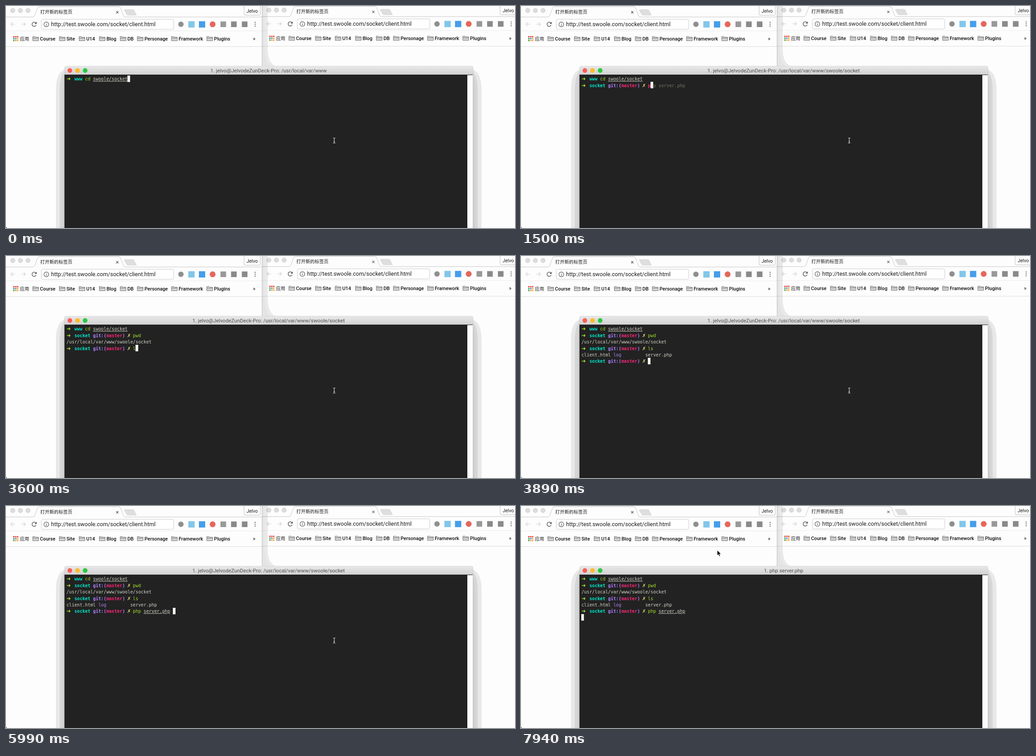
Animation, 1132 px wide and 495 px high, one loop 8000 ms. Source, as an HTML page:

```html
<!DOCTYPE html>
<html lang="en">
<head>
<meta charset="utf-8">
<title>Terminal session</title>
<style>
  html, body { margin: 0; width: 100%; height: 100%; overflow: hidden; background: #fdfdfd; }
  svg { display: block; }
  text { font-family: Roboto, "Noto Sans CJK SC", "Noto Sans CJK", sans-serif; fill: #1a1a1a; white-space: pre; }
  .mark { font-size: 10.8px; font-weight: 500; fill: #111; }
  .cjk { font-size: 10.2px; }
  #screen text { font: 9.83px "DejaVu Sans Mono", monospace; fill: #d2d2c6; }
  #screen .dir, #screen .git, #screen .branch, #screen .bad { font-weight: bold; }
  #screen .arrow, #screen .dirty { font: bold 11.5px "DejaVu Sans", sans-serif; fill: #a6e22e; }
  #screen .dir { fill: #00e6c8; }
  #screen .git, #screen .folder { fill: #ae81ff; }
  #screen .branch, #screen .bad { fill: #f92672; }
  #screen .dirty { font-size: 10.5px; fill: #e6db74; }
  #screen .cmd { fill: #a6e22e; }
  #screen .ghost { fill: #75715e; }
  #screen .path { text-decoration: underline; }
</style>
</head>
<body>
<svg width="1132" height="495" viewBox="0 0 1132 495">
  <defs>
    <linearGradient id="bar" x2="0" y2="1">
      <stop stop-color="#e8e8e8"/><stop offset="1" stop-color="#d2d2d2"/>
    </linearGradient>
    <g id="browser">
      <rect width="570" height="496" fill="#fdfdfd"/>
      <path d="M0 24.5H60Q63 24 64 21L70 5Q71 2 75 1.500H250Q254 2 255 5L261 21Q262 24 265 24.500H570" fill="none" stroke="#c6c6c6"/>
      <path d="M264 8H282Q284 8 285 10L290 20.500H272Q269 20.500 268 18L263 9.500Z" fill="#dedede" stroke="#cfcfcf" stroke-width=".7"/>
      <g fill="#dcdcdc" stroke="#cacaca" stroke-width=".8">
        <circle cx="15" cy="10" r="5"/><circle cx="32" cy="10" r="5"/><circle cx="49" cy="10" r="5"/>
      </g>
      <text class="cjk" x="76.300" y="16.800">打开新的标签页</text>
      <path d="M245 11.500l5 5m0-5l-5 5" stroke="#555" stroke-width="1.100"/>
      <rect x="529.5" y="-3" width="36" height="23.500" rx="2.500" fill="#fefefe" stroke="#c0c0c0"/>
      <text x="535" y="14.700" font-size="10.500">Jelvo</text>
      <g fill="none" stroke="#d9d9d9" stroke-width="1.400">
        <path d="M20 40.500H10.500m4.500-4.500l-4.500 4.500 4.500 4.500M34 40.500h9.500m-4.500-4.500l4.500 4.500-4.500 4.500"/>
        <path d="M66.500 38a4.700 4.700 0 1 0 .5 4.500" stroke="#606060" stroke-width="1.500"/>
      </g>
      <path d="M68.300 35v5h-5z" fill="#606060"/>
      <rect x="78.5" y="29.500" width="294.500" height="22.500" rx="3" fill="#fff" stroke="#cbcbcb"/>
      <circle cx="89.700" cy="41" r="5.300" fill="none" stroke="#5a5a5a" stroke-width="1.200"/>
      <path d="M89.700 40.300v3.700M89.700 37.800v1.300" stroke="#5a5a5a" stroke-width="1.300"/>
      <text x="100.300" y="45.200" font-size="12.500">http://test.swoole.com/socket/client.html</text>
      <circle cx="389" cy="40.800" r="6" fill="#8f8f8f"/>
      <rect x="405.500" y="34" width="14" height="14" fill="#82c6ea"/>
      <rect x="429" y="34" width="14" height="14" fill="#469eea"/>
      <circle cx="459.500" cy="40.800" r="6.500" fill="#e5675c"/>
      <rect x="477" y="34.500" width="12.500" height="12.500" fill="#999"/>
      <rect x="500.500" y="34.500" width="12.500" height="12.500" fill="#8a8a8a"/>
      <rect x="524.500" y="34.500" width="12.500" height="12.500" fill="#8a8a8a"/>
      <path d="M554 36.500v.01m0 4.200v.01m0 4.200v.01" stroke="#555" stroke-width="2.300" stroke-linecap="round"/>
      <path d="M0 55.500H570" stroke="#ececec"/>
      <g id="bookmarks"></g>
      <text class="cjk" x="31" y="77">应用</text>
      <text x="549" y="76.500" font-size="12">»</text>
      <path d="M0 90.500H570" stroke="#dcdcdc"/>
    </g>
    <g id="shadow">
      <path d="M131 141Q111 149 111 186V496H131Z" fill="#e8e8e8"/>
      <path d="M131 146Q119.500 156 119.500 190V496H131Z" fill="#d6d6d6"/>
      <path d="M131 152Q126.500 162 126.500 194V496H131Z" fill="#cccccc"/>
    </g>
  </defs>

  <use href="#browser" x="569.5" y="-.8"/>
  <g style="mix-blend-mode:multiply">
    <path d="M570 0H582V95Q582 127 600 134.500H570Z" fill="#ebebeb"/>
    <path d="M570 0H574V90Q575 124 588 134.500H570Z" fill="#e6e6e6"/>
  </g>
  <use href="#browser"/>
  <path d="M569.500 0V135" stroke="#bdbdbd"/>
  <path d="M0 492.500Q.5 494.500 2.500 495H0Z"/>

  <use href="#shadow"/>
  <use href="#shadow" transform="matrix(-1 0 0 1 1168.500 0)"/>
  <path d="M130 153V138.500Q130 134 134.500 134H1034.500Q1039 134 1039 138.500V153Z" fill="url(#bar)" stroke="#c4c4c4" stroke-width=".5"/>
  <circle cx="142" cy="143.700" r="5.200" fill="#fb5f57"/>
  <circle cx="159" cy="143.700" r="5.200" fill="#fdbd2e"/>
  <circle cx="176" cy="143.700" r="5.200" fill="#2ac940"/>
  <text id="title" x="584" y="148" font-size="11.500" text-anchor="middle" style="fill:#505050"></text>
  <rect x="130" y="153" width="908" height="342" fill="#222"/>
  <rect x="1026" y="154" width="12" height="341" fill="#fcfcfc"/>
  <g id="screen"></g>
  <path id="beam" d="M-2.500-6Q0-6 0-4Q0-6 2.500-6M0-4V4M-2.500 6Q0 6 0 4Q0 6 2.500 6M-1.500 2h3" fill="none" stroke="#eee"/>
  <path id="pointer" d="M436.300 98.500V110.500L439 108L441 112.500L443.200 111.500L441.200 107.200H445Z" fill="#000" stroke="#fff" stroke-width=".9"/>
</svg>
<script>
const $ = id => document.getElementById(id);
const LOOP = 8000, LEFT = 134.4, TOP = 155.4, CELL = 5.917, LINE = 14.37;
const COMMAND = 'php server.php', INPUT = 25;

// [time, row, column] of the block cursor
const cursorStops = [
  [0, 0, 23], [300, 1, 0], [450, 1, 25], [1500, 1, 26], [1650, 1, 28], [1950, 3, 25],
  [3600, 3, 26], [3740, 5, 0], [3890, 5, 25], [4940, 5, 26], [5090, 5, 28], [5240, 5, 29],
  [5540, 5, 30], [5690, 5, 32], [5990, 5, 40], [6590, 6, 0]
];

const run = (row, col, text, style = '') =>
  `<text x="${LEFT + col * CELL}" y="${TOP + 11 + row * LINE}" class="${style}">${text}</text>`;

const prompt = row => run(row, 0, '➜', 'arrow') + run(row, 3, 'socket', 'dir') + run(row, 10, 'git:(', 'git') +
  run(row, 15, 'master', 'branch') + run(row, 21, ')', 'git') + run(row, 22.8, '✗', 'dirty');

// The block sits on whole pixels
const block = (row, col) =>
  `<rect x="${Math.floor(LEFT + col * CELL)}" y="${Math.floor(TOP + row * LINE)}" width="6" height="14.5" fill="#f3f3ee"/>`;

function screenAt(t) {
  const [, row, col] = cursorStops.filter(stop => stop[0] <= t).pop();
  let out = run(0, 0, '➜', 'arrow') + run(0, 3, 'www', 'dir') + run(0, 7, 'cd', 'cmd') + run(0, 10, 'swoole/socket', 'path');
  if (t >= 450) out += prompt(1);
  if (t >= 1500) out += t < 1650 ? run(1, INPUT, 'p', 'bad') : run(1, INPUT, 'pwd', 'cmd');
  if (t >= 1950) out += run(2, 0, '/usr/local/var/www/swoole/socket') + prompt(3);
  if (t >= 3600) out += run(3, INPUT, t < 3740 ? 'l' : 'ls', 'cmd');
  if (t >= 3740) out += run(4, 0, 'client.html') + run(4, 12, 'log', 'folder') + run(4, 24, 'server.php');
  if (t >= 3890) out += prompt(5);
  if (t >= 4940) {
    const typed = row === 5 ? COMMAND.slice(0, col - INPUT) : COMMAND;
    out += run(5, INPUT, typed.slice(0, 3), typed === 'p' ? 'bad' : 'cmd') + run(5, INPUT + 4, typed.slice(4), 'path');
  }
  if ((t >= 1500 && t < 1650) || (t >= 4940 && t < 5990))
    out += run(row, col + 1, COMMAND.slice(col + 1 - INPUT), 'ghost');
  return out + block(row, col);
}

function titleAt(t) {
  if (t >= 6590) return '1. php server.php';
  return '1. jelvo@JelvodeZunDeck-Pro: /usr/local/var/www' + (t < 450 ? '' : '/swoole/socket');
}

function drawBookmarks() {
  const folders = { Course: 59, Site: 118, U14: 162, Blog: 207, DB: 253.5, Personage: 291.5, Framework: 367.5, Plugins: 446 };
  const colors = { r: '#e5493a', g: '#3f9f58', b: '#4a86e8', y: '#f0a030' };
  let out = '';
  [...'rrrgbygyy'].forEach((color, i) => {
    const x = 16 + i % 3 * 4.2, y = 67 + Math.floor(i / 3) * 4.2;
    out += `<rect x="${x}" y="${y}" width="3" height="3" fill="${colors[color]}"/>`;
  });
  for (const [name, x] of Object.entries(folders))
    out += `<path d="M${x + .5} 77.500v-9.500h5l1.500 1.500h6.500v8zM${x + .5} 71.500h13" fill="#d0d0d0" stroke="#707070" stroke-width=".9"/>
      <text class="mark" x="${x + 16.5}" y="76.500">${name}</text>`;
  $('bookmarks').innerHTML = out;
}

let shown;
function frame() {
  const t = performance.now() % LOOP;
  const screen = screenAt(t);
  if (screen !== shown) $('screen').innerHTML = shown = screen;
  $('title').textContent = titleAt(t);
  $('beam').setAttribute('transform', t < 7790 ? 'translate(730 300)' : 'translate(698 278)');
  $('beam').style.display = t < 7940 ? '' : 'none';
  $('pointer').style.display = t < 7940 ? 'none' : '';
  requestAnimationFrame(frame);
}

drawBookmarks();
frame();
</script>
</body>
</html>
```
